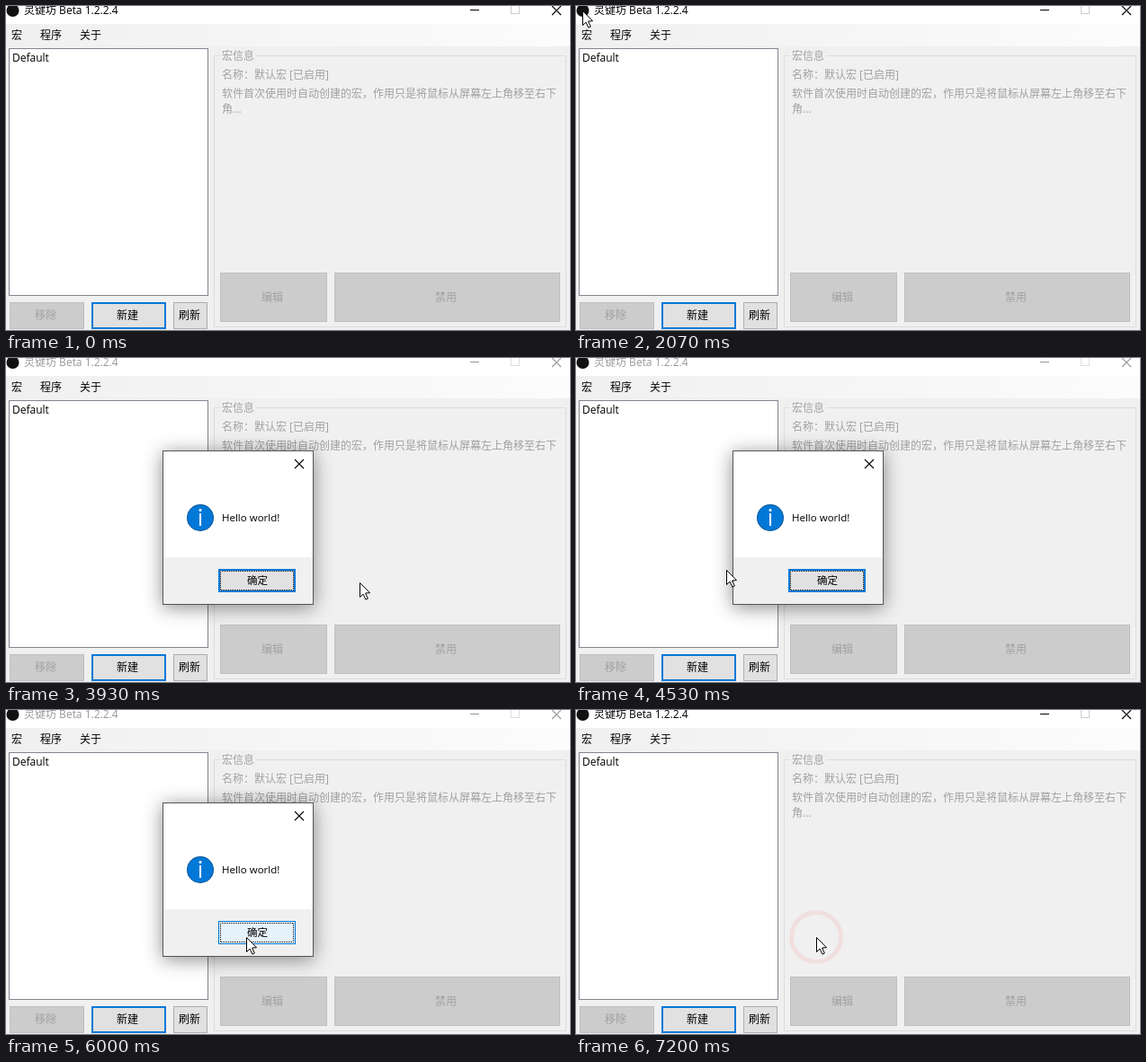
An HTML page with a canvas that plays this animation: 627 by 361 pixels, repeating every 7340 ms.

```html
<!DOCTYPE html>
<html lang="zh-CN">
<head>
<meta charset="utf-8">
<style>
html, body { margin: 0; width: 100%; height: 100%; overflow: hidden; background: #f0f0f0; }
canvas { display: block; }
</style>
</head>
<body>
<canvas id="stage" width="627" height="361"></canvas>
<script>
const W = 627, H = 361, LOOP = 7340, STEP = 200 / 3;
const FONT = '"Open Sans", "Noto Sans CJK SC", "Noto Sans CJK", sans-serif';
const BLUE = '#0078d7', GREY = '#a0a0a0', FACE = '#f0f0f0';
const ctx = document.getElementById('stage').getContext('2d');
const layer = document.createElement('canvas');
layer.width = W;
layer.height = H;
const box = layer.getContext('2d');

const clamp = v => Math.max(0, Math.min(1, v));
const progress = (t, from, to) => clamp((t - from) / (to - from));
const easeOut = k => 1 - (1 - k) ** 2;
const mix = (a, b, k) => a.map((v, i) => v + (b[i] - v) * k);

const REST = [399, 250], OK = [267, 253], LANDING = [258, 213];

// Clockwise lap around the dialog, starting on its left
function orbit(k) {
  const a = Math.PI + 5.03 * k;
  return [270 + 131 * Math.cos(a), 179.5 + 87.5 * Math.sin(a)];
}

function pointer(t) {
  if (t < 999) return null;
  if (t < 2066) return mix([595, 220], [354, 171], easeOut(progress(t, 1000, 1333)));
  if (t < 3900) return mix([7, 5], REST, progress(t, 2133, 2400));
  if (t < 4633) {
    const k = progress(t, 3933, 4600);
    const [x, y] = mix([393, 250], [142, 250], k);
    return [x, y - 44 * Math.sin(Math.PI * k)];
  }
  if (t < 5134) return orbit(progress(t, 4667, 5133));
  if (t < 5434) return mix(orbit(1), LANDING, easeOut(progress(t, 5133, 5400)));
  return mix(LANDING, OK, easeOut(progress(t, 5400, 6000)));
}

function rect(c, x, y, w, h, fill) {
  c.fillStyle = fill;
  c.fillRect(x, y, w, h);
}

function panel(c, x, y, w, h, fill, edge, line = 1) {
  rect(c, x, y, w, h, edge);
  rect(c, x + line, y + line, w - 2 * line, h - 2 * line, fill);
}

function text(c, s, x, y, color = '#000', size = 12) {
  c.font = size + 'px ' + FONT;
  c.fillStyle = color;
  c.fillText(s, x, y);
}

function button(label, x, y, w, h, enabled, focus) {
  const edge = focus ? BLUE : enabled ? '#adadad' : '#bfbfbf';
  panel(ctx, x, y, w, h, enabled ? '#e1e1e1' : '#ccc', edge, focus ? 2 : 1);
  text(ctx, label, Math.ceil(x + w / 2 - 13.5), Math.floor(y + h / 2 + 4.5), enabled ? '#000' : GREY);
}

function cross(c, x, y, color) {
  c.strokeStyle = color;
  c.lineWidth = 1.1;
  c.beginPath();
  c.moveTo(x, y);
  c.lineTo(x + 10, y + 10);
  c.moveTo(x + 10, y);
  c.lineTo(x, y + 10);
  c.stroke();
}

function disc(c, x, y, r, color) {
  c.fillStyle = color;
  c.beginPath();
  c.arc(x, y, r, 0, 7);
  c.fill();
}

function drawTitle(active) {
  const ink = active ? '#000' : '#999';
  rect(ctx, 0, 0, W, 20, '#fff');
  disc(ctx, 7.5, 5, 7, '#111');
  text(ctx, '灵键坊 Beta 1.2.2.4', 20, 9, ink);
  rect(ctx, 516, 4, 10, 1, ink);
  ctx.strokeStyle = active ? '#ccc' : '#ddd';
  ctx.lineWidth = 1;
  ctx.strokeRect(561.5, -0.5, 9, 9);
  cross(ctx, 607, 0, ink);
}

function drawMenu() {
  const bar = ctx.createLinearGradient(0, 0, W, 0);
  bar.addColorStop(0, FACE);
  bar.addColorStop(1, '#fcfcfc');
  rect(ctx, 0, 20, W, 25, bar);
  text(ctx, '宏', 6, 37);
  text(ctx, '程序', 38, 37);
  text(ctx, '关于', 82, 37);
}

function drawWindow(active) {
  rect(ctx, 0, 0, W, H, FACE);
  drawTitle(active);
  drawMenu();

  panel(ctx, 3, 47, 222, 276, '#fff', '#828790');
  text(ctx, 'Default', 7, 62);

  panel(ctx, 231, 55, 392, 303, FACE, '#dcdcdc');
  rect(ctx, 238, 54, 40, 3, FACE);
  text(ctx, '宏信息', 240, 60, GREY);
  text(ctx, '名称：默认宏 [已启用]', 240, 81, GREY);
  text(ctx, '软件首次使用时自动创建的宏，作用只是将鼠标从屏幕左上角移至右下', 240, 102, GREY);
  text(ctx, '角...', 240, 119, GREY);

  button('编辑', 238, 297, 119, 55);
  button('禁用', 365, 297, 251, 55);
  button('移除', 4, 330, 83, 30);
  button('新建', 95, 330, 83, 30, true, true);
  button('刷新', 186, 330, 38, 30, true);
}

function drawDialog(hover, pressed) {
  box.clearRect(0, 0, W, H);
  box.save();
  box.shadowColor = 'rgba(0,0,0,.45)';
  box.shadowBlur = 20;
  box.shadowOffsetY = 3;
  rect(box, 174, 103, 168, 172, '#555');
  box.restore();
  rect(box, 175, 104, 166, 170, '#fff');
  rect(box, 175, 222, 166, 52, FACE);
  cross(box, 321, 113, '#000');

  disc(box, 216, 178, 15, '#07569b');
  disc(box, 216, 178, 14, BLUE);
  disc(box, 216, 169.5, 1.5, '#fff');
  rect(box, 215, 173, 2, 14, '#fff');
  text(box, 'Hello world!', 240, 182, '#000', 11.5);

  const fill = pressed ? '#cce4f7' : hover ? '#e5f1fb' : '#e1e1e1';
  panel(box, 236, 235, 86, 26, fill, pressed ? '#005499' : BLUE, hover ? 1 : 2);
  box.strokeStyle = '#000';
  box.lineWidth = 1;
  box.setLineDash([1, 1]);
  box.lineDashOffset = 0.5;
  box.strokeRect(238.5, 237.5, 81, 21);
  text(box, '确定', 268, 252, '#000', 11.5);
  box.setLineDash([]);
}

function showDialog(alpha) {
  const s = 1 - 0.04 * (1 - alpha), cx = 258, cy = 189;
  ctx.save();
  ctx.globalAlpha = alpha;
  ctx.translate(cx, cy);
  ctx.scale(s, s);
  ctx.drawImage(layer, -cx, -cy);
  ctx.restore();
}

function drawRing(t) {
  const k = progress(t, 6733, 7200);
  ctx.strokeStyle = `rgba(255,60,60,${0.6 - 0.51 * k})`;
  ctx.lineWidth = 5;
  ctx.beginPath();
  ctx.arc(...OK, 27.5 * k, 0, 7);
  ctx.stroke();
}

const arrow = new Path2D('M0 0V16L3.6 12.6L6.4 18.6L8.8 17.5L6.1 11.5L11 11.2Z');

function drawPointer(x, y) {
  ctx.save();
  ctx.translate(x + 0.5, y + 0.5);
  ctx.fillStyle = '#fff';
  ctx.fill(arrow);
  ctx.strokeStyle = '#000';
  ctx.lineWidth = 1;
  ctx.stroke(arrow);
  ctx.restore();
}

function dialogAlpha(t) {
  return easeOut(progress(t, 2533, 2800)) * (1 - progress(t, 6867, 7067));
}

function draw(now) {
  const t = Math.floor((now % LOOP + 5) / STEP) * STEP;
  const pos = pointer(t)?.map(Math.round);
  const alpha = dialogAlpha(t);
  drawWindow(t < 2599 || t > 6900);
  if (alpha > 0.01) {
    const [x, y] = pos;
    const hover = x >= 236 && x < 322 && y >= 235 && y < 261;
    drawDialog(hover, t > 6799 && t < 6866);
    showDialog(alpha);
  }
  if (t > 6799) drawRing(t);
  if (pos) drawPointer(...pos);
}

const start = performance.now();
function tick() {
  draw(performance.now() - start);
  requestAnimationFrame(tick);
}
tick();
</script>
</body>
</html>
```
